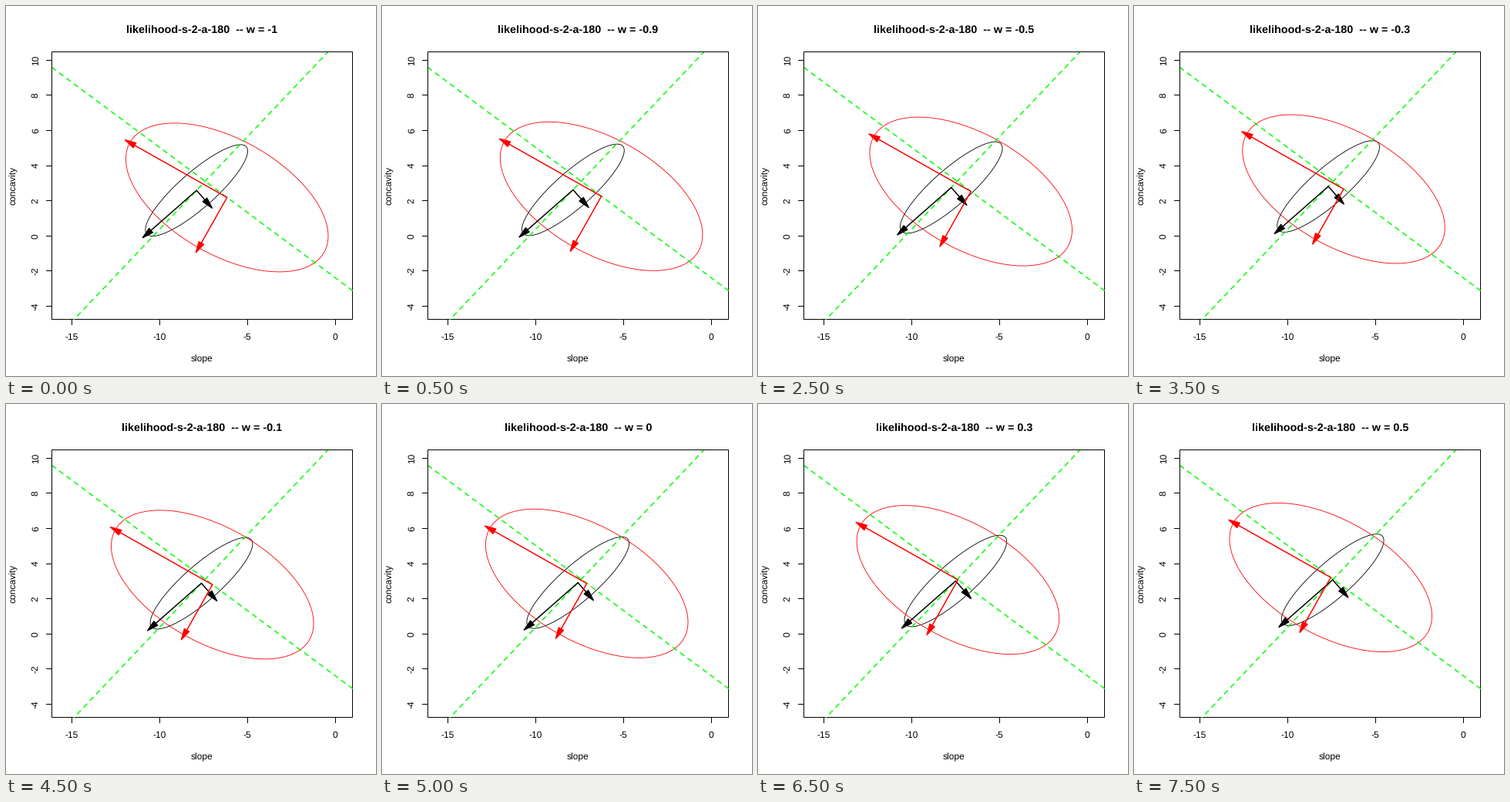
Recreate the animation shown at these times as a matplotlib script. Size 480x480 px, loop 8000 ms.

```python
import numpy as np
import matplotlib.pyplot as plt
from matplotlib.animation import FuncAnimation
from matplotlib.patches import Polygon, Rectangle

plt.rcParams["font.family"] = "Liberation Sans"
plt.rcParams["text.hinting"] = "none"

SIZE, DPI = 480, 80
PX = 72 / DPI                       # one pixel in points
STEPS, INTERVAL = 16, 500
LEFT, RIGHT, TOP, BOTTOM = 59.5, 449.5, 59.5, 406.5
UNIT, X0, Y0 = 22.8, 427.1, 298.3   # pixels per data unit, data origin
THIN, THICK = 0.85, 1.5
LIME = "#00ff00"

fig = plt.figure(figsize=(SIZE / DPI, SIZE / DPI), dpi=DPI, facecolor="white")
ax = fig.add_axes([0, 0, 1, 1])
ax.set(xlim=(0, SIZE), ylim=(SIZE, 0))
ax.axis("off")


def line(xs, ys, color="black", width=THIN, **kw):
    return ax.plot(xs, ys, color=color, lw=width * PX, snap=False, **kw)[0]


def label(x, y, s, size=12, **kw):
    return ax.text(x, y, s, fontsize=size * PX, ha="center", va="baseline", **kw)


def side_label(x, y, s):
    label(x, y, s, rotation=90, rotation_mode="anchor")


def crisp(v):
    """Centre of the pixel that holds v."""
    return np.floor(v) + 0.5


# Triangular arrowhead pointing along +x, centred on its length
HEAD = np.array([[-7.05, -3.53], [7.05, 0], [-7.05, 3.53]])


class Arrow:
    def __init__(self, color, vec, z):
        self.vec = np.array(vec)
        c, s = self.vec / np.hypot(*vec)
        self.head = HEAD @ np.array([[c, s], [-s, c]])
        self.shaft = line([], [], color, THICK, zorder=z, solid_capstyle="round")
        self.tip = Polygon(self.head, closed=True, fc=color, ec=color,
                           lw=THICK * PX, joinstyle="round", zorder=z)
        ax.add_patch(self.tip)

    def move(self, center):
        end = center + self.vec
        self.shaft.set_data(*np.array([center, end]).T)
        self.tip.set_xy(self.head + end)


class Spread:
    """Ellipse with its two principal axes, sliding along a straight path."""

    def __init__(self, color, start, step, a, b, angle, z):
        self.start, self.step = np.array(start), np.array(step)
        c, s = np.cos(np.radians(angle)), np.sin(np.radians(angle))
        major = a * np.array([c, s])
        minor = b * np.array([s, -c])
        t = np.linspace(0, 2 * np.pi, 201)
        self.ring = np.outer(np.cos(t), major) + np.outer(np.sin(t), minor)
        self.curve = line([], [], color, zorder=2)
        self.arrows = [Arrow(color, v, z) for v in (major, minor)]

    def move(self, k):
        center = self.start + k * self.step
        self.curve.set_data(*(self.ring + center).T)
        for arrow in self.arrows:
            arrow.move(center)


# Frame, ticks and labels
frame = Rectangle((LEFT, TOP), RIGHT - LEFT, BOTTOM - TOP, fill=False,
                  ec="black", lw=PX, snap=False, joinstyle="miter", zorder=1)
ax.add_patch(frame)
for v in range(-15, 1, 5):
    x = X0 + UNIT * v
    line([crisp(x)] * 2, [BOTTOM, BOTTOM + 7], width=1)
    label(x, 432.7, str(v))
for v in range(-4, 11, 2):
    y = Y0 - UNIT * v
    line([LEFT - 7, LEFT], [crisp(y)] * 2, width=1)
    side_label(41.8, y, str(v))
label(254.4, 461.5, "slope")
side_label(13.2, 232.6, "concavity")
title = label(254.4, 34.8, "", 14.4, weight="bold")

# Dashed guides, each running the full width before clipping
for ys in ((79.7, 369.1), (437.0, 26.0)):
    line((LEFT, RIGHT), ys, LIME, THICK, linestyle=(0, (4, 4)),
         dash_capstyle="round", zorder=3).set_clip_path(frame)

spreads = [
    Spread("black", (247.2, 239.2), (0.7, -0.74), 85.9, 23.4, 138.7, 4),
    Spread("red", (286.7, 248.4), (-2.1, -1.56), 144.7, 74.9, 209.45, 5),
]


def draw(k):
    title.set_text(f"likelihood-s-2-a-180  -- w = {(k - 10) / 10:g}")
    for s in spreads:
        s.move(k)
    return []


anim = FuncAnimation(fig, draw, frames=STEPS, interval=INTERVAL,
                     repeat=True, repeat_delay=0, blit=False)
plt.show()
```
